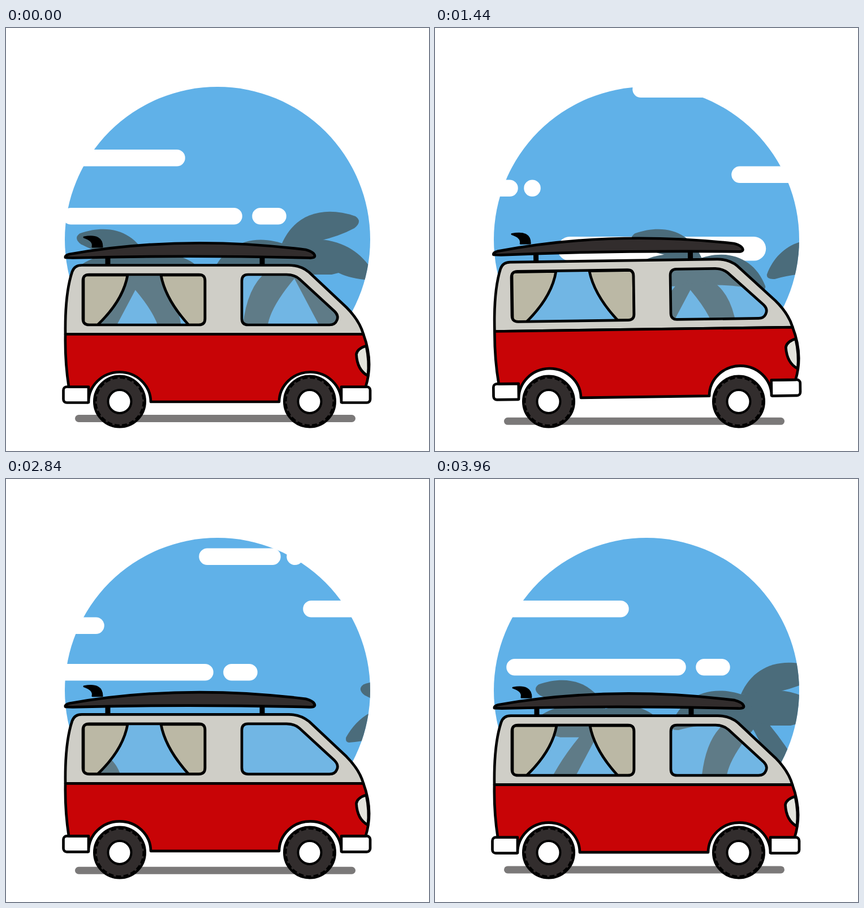
Recreate the animation shown at these times as an HTML page. Size 748 by 748 pixels, loop 4 s.

```html
<!DOCTYPE html>
<html lang="en">
<head>
<meta charset="utf-8">
<title>Van ride</title>
<style>
  html, body { margin: 0; width: 100%; height: 100%; overflow: hidden; background: #fff; }
  svg { display: block; width: 100%; height: 100%; }
</style>
</head>
<body>
<svg viewBox="0 0 748 748">
  <defs>
    <clipPath id="disc"><circle cx="374" cy="374" r="270"/></clipPath>

    <!-- Three leaves, then the drooping leaf with the trunk -->
    <g id="palm">
      <path d="M488 381C510 330 560 313 618 333Q631 342 616 354Q590 368 555 376Z"/>
      <path d="M488 381L545 373C600 375 632 400 652 436Q654 446 646 446Q610 444 588 433L576 436H500Z"/>
      <path d="M500 385C440 360 385 380 364 436Q363 445 378 444Q430 428 520 436Z"/>
      <path d="M470 425Q425 450 418 535H462Q462 500 510 443L556 530L580 640H630Q625 540 538 434Z"/>
    </g>
    <g id="grove">
      <use href="#palm" transform="matrix(-.909 0 0 .909 692.3 60.5)"/>
      <use href="#palm"/>
      <use href="#palm" transform="matrix(-.673 0 0 .673 1064.8 227)"/>
    </g>

    <g id="sky" fill="none" stroke="#fff" stroke-width="29.500" stroke-linecap="round">
      <path id="streak" d="M1403 259.300h460"/>
      <use href="#streak" x="841" y="-29.500"/>
      <path id="pair" d="M1768 341.800h288m47 0h31"/>
      <use href="#pair" x="749" y="-9"/>
      <use href="#pair" x="-540" y="-233.500"/>
      <path id="dashes" d="M881 283.300h115m40 0h.1"/>
      <use href="#dashes" x="1179" y="-146"/>
      <path d="M794 283.300h40"/>
      <path d="M586 169.300h267M1102 390.300h326" stroke-width="42.500"/>
    </g>

    <g id="wheel">
      <circle r="45" fill="#322d2d" stroke="#000" stroke-width="4"/>
      <circle class="tread" r="42" fill="none" stroke="#000" stroke-width="3" stroke-dasharray="9 4.2"/>
      <circle r="20.500" fill="#fff" stroke="#000" stroke-width="4"/>
    </g>
  </defs>

  <circle cx="374" cy="374" r="270" fill="#60b1e8"/>
  <g id="clouds"><use href="#sky"/><use href="#sky" x="-2402"/></g>
  <g clip-path="url(#disc)" fill="#4b6c7b">
    <g id="palms"><use href="#grove"/><use href="#grove" x="1120"/></g>
  </g>

  <path id="shadow" d="M128.500 0H611.500" stroke="#7b7979" stroke-width="13" stroke-linecap="round"/>

  <g id="van" stroke="#000" stroke-width="4.700" stroke-linejoin="round">
    <path d="M180 400V420M453 400V420" stroke-width="9"/>
    <path d="M138 370Q170 364 170 387H153Q156 376 138 370Z" stroke-width="3"/>
    <path fill="#322d2d" d="M105 406Q104 402 112 400Q310 365 530 392Q545 396 546 403Q546 407 536 406.500Q320 401 118 406.500Z"/>

    <path fill="#cfcec9" fill-opacity=".15" stroke="none" d="M130 430H510L590 505V530H130Z"/>
    <g fill="#bbb8a5">
      <path d="M137 437H215Q207 482 162 525H137Z"/>
      <path d="M274 437H352V525H323Q282 480 274 437Z"/>
    </g>
    <path fill="#cfcec7" fill-rule="evenodd" d="M105 541.500Q104 470 117 431Q121 419.500 134 419.500H500Q521 419.500 536 432L602 494Q625 517 632 541.500Z
             M147 436H341q11 0 11 11V514q0 11-11 11H147q-11 0-11-11V447q0-11 11-11Z
             M428 436H496Q510 436 519 444L581 501Q589 509 585 517Q582 525 572 525H428q-11 0-11-11V447q0-11 11-11Z"/>

    <g fill="#fff">
      <rect x="101.500" y="634.500" width="50" height="28" rx="6"/>
      <rect x="588" y="634.500" width="56" height="28" rx="6"/>
    </g>
    <path fill="#fff" stroke="none" d="M146 636H593V666H483V650H256V666H146Z"/>
    <path fill="#c80406" d="M105 541.500H632Q650 590 636 634.500H593V662A55 53 0 0 0 483 661H256A55 53 0 0 0 146 662V634.500H111Q104 590 105 541.500Z"/>
    <path fill="#e4e5dd" d="M637 562Q621 567 619.500 577Q621 605 640 615Q643 590 637 562Z"/>
  </g>

  <use href="#wheel" x="201" y="660.500"/>
  <use href="#wheel" x="537" y="660.500"/>
</svg>
<script>
  const LOOP = 4000, STEP = 40, BOUNCE = 1000;
  const GROVE_SPAN = 1120;
  const tread = document.querySelector('.tread');
  const move = (id, transform) => document.getElementById(id).setAttribute('transform', transform);

  function draw(now) {
    const t = Math.floor(now % LOOP / STEP) * STEP;
    const beat = t % BOUNCE / BOUNCE;
    const lift = 1 - Math.abs(1 - 2 * beat);
    // The nose rises with the body but settles sooner.
    const tilt = beat < .5 ? lift : Math.max(0, 1 - (beat - .5) / .3);

    move('clouds', `translate(${-0.6 * t})`);
    move('palms', `translate(${-(1.4008 * t % GROVE_SPAN)})`);
    move('shadow', `translate(0 ${690.5 + 5.5 * lift})`);
    move('van', `translate(0 ${-10 * lift}) rotate(${-0.92 * tilt} 373 514)`);
    tread.setAttribute('transform', `rotate(${t * .36})`);
    requestAnimationFrame(draw);
  }
  requestAnimationFrame(draw);
</script>
</body>
</html>
```
